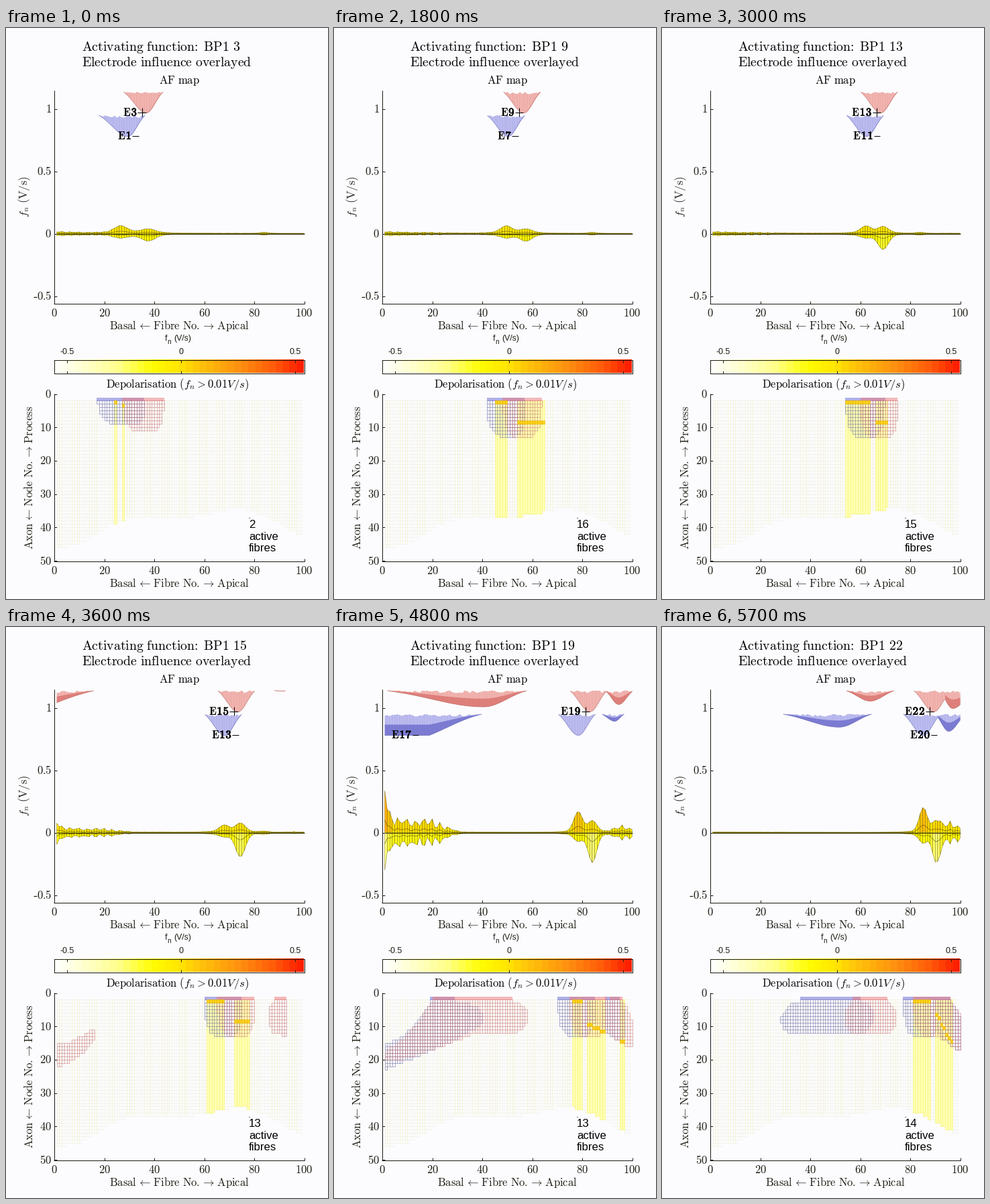
A matplotlib script that plays this animation: 480x851 px, repeating every 6000 ms.

```python
import numpy as np
import matplotlib
import matplotlib.pyplot as plt
from matplotlib.animation import FuncAnimation
from matplotlib.collections import LineCollection, PolyCollection
from matplotlib.colors import LinearSegmentedColormap
from matplotlib.patheffects import withStroke

matplotlib.rcParams["mathtext.fontset"] = "cm"

W, H, DPI = 480, 851, 64
PT = 72 / DPI
INK = "#1c1c14"
SANS = "Liberation Sans"
FRAMES, STEP = 20, 300
FULL = 32  # deepest influence, in pixels

fig = plt.figure(figsize=(W / DPI, H / DPI), dpi=DPI, facecolor="#fcfcfe")
ax = fig.add_axes([0, 0, 1, 1])
ax.set_xlim(0, W)
ax.set_ylim(H, 0)
ax.axis("off")

HEAT = LinearSegmentedColormap.from_list("heat", [
    (0, "#fffffa"), (.12, "#ffffc8"), (.25, "#ffff8c"), (.34, "#ffff30"),
    (.4, "#fffa00"), (.5, "#ffe600"), (.56, "#ffcc08"), (.75, "#ff9010"),
    (.9, "#ff5808"), (1, "#ff2000")])


def px(fibre):
    return 72 + 3.725 * np.asarray(fibre, float)


def py(volts):
    return 306.5 - 186 * np.asarray(volts, float)


def pn(node):
    return 545.5 + 4.97 * np.asarray(node, float)


def sigmoid(x):
    return 1 / (1 + np.exp(-x))


# ---- drawing helpers ----------------------------------------------------
def put(x, y, s, size=16.6, ha="left", **kw):
    kw.setdefault("color", INK)
    return ax.text(x, y, s, fontsize=size * PT, ha=ha, va="baseline", **kw)


def rm(s):
    return "$" + r"\ ".join(r"\mathrm{%s}" % w for w in s.split()) + "$"


def arrows(left, mid, right):
    gap = r"\hspace{0.13}"
    return (r"$\mathrm{%s}" % left + gap + r"\leftarrow" + gap
            + r"\mathrm{%s}\ \mathrm{No.}\hspace{-0.07}\rightarrow" % mid
            + gap + r"\mathrm{%s}$" % right)


def line(xs, ys, lw=1.0, color=INK, **kw):
    return ax.plot(xs, ys, color=color, lw=lw * PT,
                   solid_capstyle="butt", **kw)[0]


def segments(segs, color, lw, **kw):
    return ax.add_collection(
        LineCollection(segs, colors=color, linewidths=lw * PT, **kw),
        autolim=False)


def polygons(polys, face, edge="none", lw=0, **kw):
    return ax.add_collection(
        PolyCollection(polys, facecolors=face, edgecolors=edge,
                       linewidths=lw, **kw), autolim=False)


def box(i, top, bottom):
    a, b = px(i), px(i + 1)
    return [(a, top), (b, top), (b, bottom), (a, bottom)]


# ---- electrode model ----------------------------------------------------
FINE = np.linspace(1, 100, 397)
CELLS = np.arange(100) + .5
FLOOR = np.rint(np.interp(CELLS, [0, 10, 22, 31, 53, 74, 84, 100],
                          [46, 45, 39.4, 37, 37, 34, 36, 43]))


def centre(e):
    return 25.7 + 3.8 * e - .041 * e * e


def lobes(e):
    """(centre, left reach, right reach, depth): main, previous turn, apex."""
    d = 22 - e
    return [
        (centre(e), 8 + 4 / e, 7, FULL),
        (64 - 3 * d - 1.6 * d * d, 10 + 3.3 * d * d, 10 + .85 * d * d,
         16 + .95 * d * d),
        (97 - .8 * d, 5.5, max(e - 13, 1), min(max(5 * e - 74, 0), 27)),
    ]


def offset(lobe, f):
    c, left, right, _ = lobe
    return np.where(f < c, (c - f) / left, (f - c) / right)


def strength(lobe, f):
    """Gaussian field above its threshold."""
    cut = np.exp(-1.8)
    g = (np.exp(-1.8 * offset(lobe, f) ** 2) - cut) / (1 - cut)
    return lobe[3] * np.clip(g, 0, None)


def label_fibre(e):
    parts = [strength(l, FINE) for l in lobes(e)]
    best = max(parts, key=np.max)
    return FINE[np.argmax(best)]


def region(e):
    """Cells of the node map that the electrode reaches."""
    mask = np.zeros((50, 100), bool)
    apex = .55 * np.clip(CELLS - 91, 0, None)
    top = (np.clip(15 - .033 * CELLS ** 2, 2, None)
           + 1.2 * np.clip(CELLS - 96, 0, None))
    bottom = np.maximum(12.5, 23 - .3 * CELLS) + apex
    deep = 13 - 4 * np.exp((1 - e) / 2.5) + apex
    for n, lobe in enumerate(lobes(e)):
        if lobe[3] <= 0:
            continue
        u = offset(lobe, CELLS)
        s = np.sqrt(np.clip(1 - u ** 4, 0, 1))
        if n == 0:
            a, b = np.full(100, 2.0), 2 + (deep - 2) * s
        else:
            mid, half = (top + bottom) / 2, (bottom - top) / 2 * s
            a, b = mid - half, mid + half
        for i in np.where(u < 1)[0]:
            mask[max(2, round(a[i])):round(b[i]), i] = True
    mask[:, 0] = False
    return mask


# ---- static parts -------------------------------------------------------
def build_axes():
    line([71.5, 71.5], [93, 410.5])
    line([71, 444.5], [410.5, 410.5])
    line([71.5, 71.5], [545, 794.5])
    line([71, 444.5], [794.5, 794.5])
    for f in range(0, 101, 20):
        x = float(px(f))
        for base in (410.5, 794.5):
            line([x, x], [base, base - 4])
            put(x, base + 19.5, rm(str(f)), ha="center")
    for v in (1, .5, 0, -.5):
        y = float(py(v))
        line([71.5, 75.5], [y, y])
        put(68, y + 5.5, rm("%g" % abs(v)), ha="right")
    line([40.5, 45.5], [400.5, 400.5], 1.2)
    for n in range(0, 51, 10):
        y = float(pn(n))
        line([71.5, 75.5], [y, y])
        put(68, y + 5.5, rm(str(n)), ha="right")


def build_text():
    put(113, 57, rm("Electrode influence overlayed"), 19.8, color="black")
    put(258, 83, rm("AF map"), ha="center", color="black")
    put(149, 536, r"$\mathrm{Depolarisation}\ (f_n>0.01V/s)$", color="black")
    for y in (449.5, 833.5):
        put(258, y, arrows("Basal", "Fibre", "Apical"), ha="center")
    turn = dict(ha="center", rotation=90, rotation_mode="anchor")
    put(32.5, 251, r"$f_n\ \mathrm{(V/s)}$", **turn)
    put(40, 670, arrows("Axon", "Node", "Process"), **turn)
    line([362, 363.2], [730, 730], 1.2, "black")
    for y, s in ((763, "active"), (780, "fibres")):
        put(362, y, s, 16.8, family=SANS, color="black")


def build_colorbar():
    put(237, 466, "f", 12.3, family=SANS)
    put(240.5, 471, "n", 10, family=SANS)
    put(250, 466, "(V/s)", 12.3, family=SANS)
    edges = np.linspace(72, 444, 37)
    shades = HEAT(np.linspace(0, 1, 36))
    polygons([[(a, 494), (b, 494), (b, 514), (a, 514)]
              for a, b in zip(edges, edges[1:])], shades, shades, .3)
    line([71.5, 444.5, 444.5, 71.5, 71.5], [494.5, 494.5, 514.5, 514.5, 494.5])
    for v in (-.5, 0, .5):
        x = 261.3 + 340 * v
        put(x, 486.5, "%g" % v, 12.5, "center", family=SANS)
        line([x, x], [494.5, 498.5])
        line([x, x], [510.5, 514.5])


def build_grid():
    dots = dict(linestyles=[(0, (1, 1))])
    rows, faint, strong = [], [], []
    for n in range(2, 47):
        on = np.where(FLOOR[1:99] >= n)[0] + 1
        for run in np.split(on, np.where(np.diff(on) > 1)[0] + 1):
            if len(run):
                rows.append([(px(run[0]), pn(n)), (px(run[-1] + 1), pn(n))])
    for i in range(1, 100):
        group = strong if np.sin(i * .87 + .4) > -.1 else faint
        group.append([(px(i), pn(2)), (px(i), pn(FLOOR[i]))])
    segments(rows, "#e8e8da", .9, **dots)
    segments(faint, "#f3f3e6", .9, **dots)
    segments(strong, "#efefc0", 1, **dots)


build_axes()
build_text()
build_colorbar()
build_grid()
title = put(113, 34, "", 19.8, color="black")
count = put(362, 745, "", 16.8, family=SANS, color="black")
moving = []


# ---- parts that follow the electrode pair -------------------------------
def draw_influence(e, plus):
    base = 94.5 if plus else 129.5
    light, dark, edge = (("#f2b4b0", "#e0807c", "#b86a62") if plus else
                         ("#bcbcf0", "#7c7cd4", "#6c6cb4"))
    main, *rest = (np.minimum(strength(l, FINE), FULL) for l in lobes(e))
    far = np.maximum(*rest)
    depth = np.maximum(main, far)
    rng = np.random.default_rng(40 + e)
    jag = np.interp(FINE, np.arange(1, 101), rng.random(100) * 4)
    jag = np.minimum(jag, depth * .4)
    x = px(FINE)
    on = depth > .4
    for lo, where, color in ((jag, on, light),
                             (far * .5, on & (far >= main), dark)):
        moving.append(ax.fill_between(x, base + lo, base + depth, where=where,
                                      color=color, linewidth=0, zorder=2))
    hatch = [[(a, base + j), (a, base + d)] for a, j, d
             in zip(x[::4], jag[::4], depth[::4]) if d > .6]
    moving.append(segments(hatch, edge, .4, alpha=.4, zorder=2.1))
    moving.append(line(x, np.where(on, base + depth, np.nan), .7, edge,
                       alpha=.8, zorder=2.2))


def draw_label(e, plus):
    x = float(px(label_fibre(e)))
    y = 125.5 if plus else 160.5
    digits = str(e)
    tail = 12.5 if plus else 9.5
    name = 12.5 + 9.5 * len(digits)
    start = x - (name + tail) / (1 if plus else 2)
    style = dict(color="black", zorder=6)
    moving.append(put(start, y + 5.2, r"$\mathbf{E}$", **style))
    for n, ch in enumerate(digits):
        moving.append(put(start + 17 + 9.5 * n, y + 5.2, rm(ch), ha="center",
                          path_effects=[withStroke(linewidth=.9,
                                                   foreground="black")],
                          **style))
    a, b = start + name, start + name + tail
    moving.append(line([a, b], [y, y], 1, **style))
    if plus:
        m = (a + b) / 2
        moving.append(line([m, m], [y - 6.2, y + 6.2], 1, **style))


def envelope(k):
    """Upper and lower extent of the activating function, in pixels."""
    f = np.arange(1, 101.0)
    neg, pos = k + 1, k + 3
    rng = np.random.default_rng(7)

    def bump(c, w):
        return np.exp(-((f - c) / w) ** 2)

    rise = 9 + 25 * sigmoid(2 * (neg - 16.3))
    fall = 8 + 33 * sigmoid((pos - 13.5) / 1.2)
    w = 3.6 - .075 * k
    near = bump(centre(neg) - 3 * np.exp(-k / 4), w)
    far = bump(centre(pos) + 1, w)
    up = rise * near + (2 + .3 * fall) * far
    down = fall * far + (1 + .33 * rise) * near

    noise = 3 * np.exp(-f / 26) * sigmoid((17.5 - k) / 1.5)
    wide = 2.2 * bump(centre(neg + 1), 11) + 1.4 * bump(84, 2.5)
    apex = 15 * sigmoid((k - 15.2) / 1.2) * bump(96.5, 5)
    spike = sum(95 * np.exp(-((e - 16.3) / .9) ** 2) for e in (neg, pos))
    turn = 16 * min(spike / 50, 1) * sigmoid((26 - f) / 2)
    turn *= 1 + .5 * np.exp(-f / 8)
    lean = .1 if k >= 15 else -.1
    out = []
    for part, sign in ((up, 1), (down, -1)):
        rough = .55 + .25 * np.cos(1.9 * f) + .4 * rng.random(100)
        part = part + .5 + wide + (noise + apex + turn) * rough
        out.append(part + spike * (.75 + sign * lean) * np.exp(1 - f))
    return f, out[0], out[1]


def draw_trace(k):
    f, up, down = envelope(k)
    x, zero = px(f), 306.5
    polys, shades = [], []
    for h, sign in ((up, -1), (down, 1)):
        for i in range(99):
            polys.append([(x[i], zero), (x[i], zero + sign * h[i]),
                          (x[i + 1], zero + sign * h[i + 1]), (x[i + 1], zero)])
            shades.append(HEAT(.45 - sign * (h[i] + h[i + 1]) / 460))
    moving.append(polygons(polys, shades, "#5a5000", .45, zorder=3))
    for part in (-up * .3, down * .3):
        moving.append(line(x, zero + part, .5, "#4a4200", zorder=3.1))
    moving.append(line(x, np.full(100, zero), .9, "#33300c", zorder=3.2))


def bands(k):
    """Fibre ranges that fire: near the cathode, near the anode, remote."""
    keys = [0, 3, 6, 10, 14, 16, 19]
    ends = ([24, 36, 45, 54, 68, 76, 81], [25, 37, 50, 64, 72, 80, 88],
            [27, 48, 54, 66, 77, 82, 90], [28, 57, 65, 71, 84, 89, 97])
    a, b, c, d = (round(float(np.interp(k, keys, e))) for e in ends)
    remote = (22, 23) if 13 <= k <= 14 else (95, 97) if 15 <= k <= 17 else (0, 0)
    return range(a, b), range(max(b, c), d), range(*remote)


def draw_active(k):
    near, far, remote = bands(k)
    node = min(3 + 2 * k, 8.3) + 1.8 * (k > 14)
    slope = .04 * max(k - 13, 0) ** 2
    mid = (far.start + far.stop) / 2
    hot = [(i, 2) for i in near]
    hot += [(i, max(2, round(node + slope * (i + .5 - mid)))) for i in far]
    hot += [(i, 13 + i // 60) for i in remote]
    moving.append(polygons([box(i, pn(2), pn(FLOOR[i])) for i, _ in hot],
                           "#ffffb4", "#f7f478", .7, zorder=2))
    moving.append(polygons([box(i, pn(n), pn(n + 1)) for i, n in hot],
                           "#ffd41c", "#e8b400", .6, zorder=5))
    return len(hot)


def draw_region(e, plus):
    mask = region(e)
    edges = set()
    for j, i in zip(*np.nonzero(mask)):
        edges |= {(i, j, i + 1, j), (i, j + 1, i + 1, j + 1),
                  (i, j, i, j + 1), (i + 1, j, i + 1, j + 1)}
    segs = [[(px(a), pn(b)), (px(c), pn(d))] for a, b, c, d in sorted(edges)]
    tint = (.76, .42, .42, .5) if plus else (.36, .36, .64, .5)
    face = (.92, .48, .48, .52) if plus else (.48, .48, .84, .58)
    moving.append(segments(segs, [tint], .95, zorder=4))
    strip = [box(i, 551, 556) for i in np.nonzero(mask[2])[0]]
    moving.append(polygons(strip, [face], zorder=4.2, antialiaseds=False))


def draw(k):
    while moving:
        moving.pop().remove()
    neg, pos = k + 1, k + 3
    title.set_text(r"$\mathrm{Activating}\ \mathrm{function}\hspace{-0.2}"
                   r"\mathrm{:}\hspace{0.3}\mathrm{BP1}\ \mathrm{%d}$" % pos)
    for e, plus in ((neg, False), (pos, True)):
        draw_influence(e, plus)
        draw_label(e, plus)
        draw_region(e, plus)
    draw_trace(k)
    count.set_text(str(draw_active(k)))
    return moving


anim = FuncAnimation(fig, draw, frames=FRAMES, interval=STEP, repeat=True,
                     repeat_delay=0, init_func=lambda: draw(0), blit=False)
plt.show()
```
